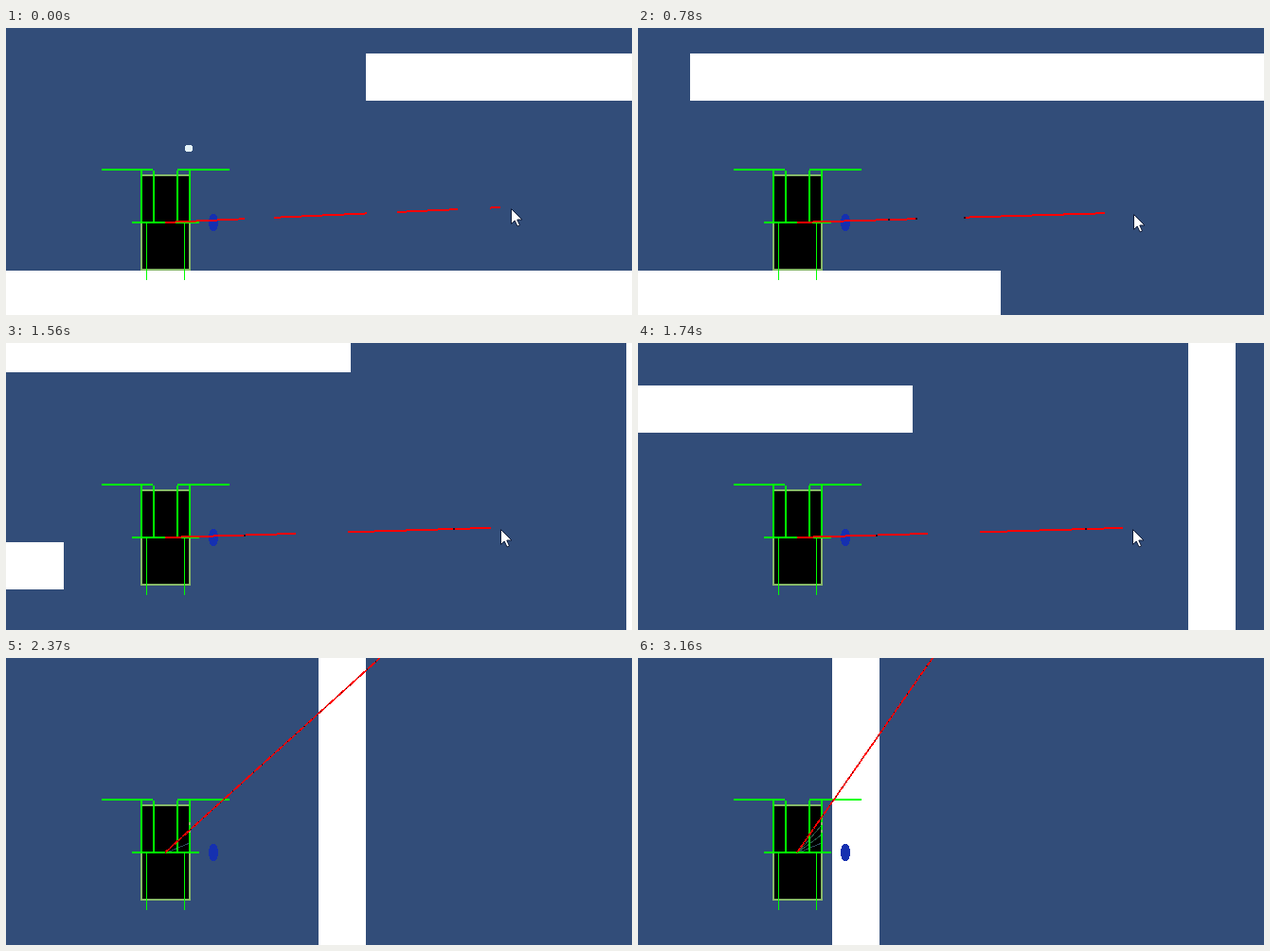
Recreate the animation shown at these times as an HTML page. Size 661 by 304 pixels, loop 3340 ms.

```html
<!DOCTYPE html>
<html lang="en">
<head>
<meta charset="utf-8">
<style>
  html, body { margin: 0; width: 100%; height: 100%; overflow: hidden; background: #324d79; }
  svg { display: block; width: 661px; height: 304px; }
</style>
</head>
<body>
<svg viewBox="0 0 661 304" shape-rendering="crispEdges">
  <rect width="661" height="304" fill="#324d79"/>
  <g fill="#fff">
    <rect id="wall" width="50" height="304"/>
    <rect id="ledge" width="631" height="50"/>
    <rect id="floor" width="1008" height="50"/>
  </g>
  <rect x="143" y="156" width="51" height="100" stroke="#86b868" stroke-width="2"/>
  <g id="fan" fill="none" stroke="#2c4a5a">
    <path d="M170 206L194 196M172 206H194"/>
    <path id="fanHigh" d="M169 206L194 187M169 206L194 177" stroke="#285848"/>
  </g>
  <g fill="none" stroke="#0f0" stroke-width="2">
    <path d="M101 150H155M181 150H236M133 206H204M143 150V206M156 151V206M181 151V206"/>
    <path id="edge" d="M194 150V206"/>
    <path d="M148.500 206V267M188.500 206V267" stroke-width="1"/>
  </g>
  <ellipse cx="219" cy="206" rx="5" ry="9.500" fill="#1530b0"/>
  <circle id="ball" cx="193" cy="127.500" r="4" fill="#e4f2f6"/>
  <path id="beam" fill="none" stroke="#f00" stroke-width="2"/>
  <path id="specks" fill="none" stroke="#300818"/>
  <path id="cursor" d="M.5 .5V16.500L4.200 13L7 19L9.500 18L6.800 12H12Z" fill="#fff" stroke="#101c38" shape-rendering="auto"/>
</svg>
<script>
const LOOP = 3340;
const el = id => document.getElementById(id);
const set = (id, attrs) => {
  for (const key in attrs) el(id).setAttribute(key, attrs[key]);
};
const show = (id, on) => set(id, { visibility: on ? 'visible' : 'hidden' });

// Piecewise linear interpolation through [time, value] pairs.
function track(t, keys) {
  for (let i = 1; i < keys.length; i++) {
    const [t0, a] = keys[i - 1], [t1, b] = keys[i];
    if (t <= t1) return a + (b - a) * Math.max(0, (t - t0) / (t1 - t0));
  }
  return keys[keys.length - 1][1];
}

function scrollX(t) {
  if (t > 2370) return 1116 - 144 * Math.exp((2370 - t) / 390);
  return track(t, [[0, 0], [780, 325], [1560, 647], [1950, 806], [2370, 972]]);
}

// The runner drops off the floor, then jumps in mid-air.
function height(t) {
  const fall = dt => 0.00124 * dt * dt;
  if (t < 1365) return 0;
  if (t < 1560) return -fall(t - 1365);
  return -47 + 0.583 * (t - 1560) - fall(t - 1560);
}

const START = { x: 168, y: 206 };

function beamParts(t) {
  if (t < 150) return [[168, 252], [283, 381], [413, 477], [511, 522]];
  if (t < 1000) return [[168, 295], [344, 493]];
  return [[168, 306], [361, 512]];
}

function drawBeam(t) {
  const sweeping = t >= 1990;
  const endX = sweeping
    ? track(t, [[1990, 512], [2160, 521], [2370, 395], [2650, 322], [2710, 321], [3000, 311]])
    : 512;
  const endY = sweeping
    ? track(t, [[1990, 196], [2160, 0]])
    : track(t, [[0, 190.500], [400, 195.500], [1990, 196]]);
  const slope = (endY - START.y) / (endX - START.x);
  const point = x => `${x} ${START.y + slope * (x - START.x)}`;
  const parts = sweeping ? [[START.x, endX]] : beamParts(t);
  set('beam', {
    d: parts.map(([a, b]) => `M${point(a)}L${point(b)}`).join(''),
    'stroke-width': sweeping ? 1.700 : 2
  });

  let dots = [];
  if (!sweeping && t >= 150) dots = t < 1000 ? [264, 293, 344] : [251, 472];
  set('specks', {
    d: sweeping ? `M${point(START.x)}L${point(endX)}`
                : dots.map(x => `M${point(x)}h2`).join(''),
    'stroke-dasharray': sweeping ? '1 5' : 'none',
    'stroke-width': sweeping ? 1 : 2
  });
}

function render(t) {
  const x = scrollX(t), y = height(t);
  set('wall', { x: Math.round(1302 - x) });
  set('ledge', { x: Math.round(380 - x), y: Math.round(27 + y) });
  set('floor', { x: Math.round(-300 - x), y: Math.round(257 + y) });
  drawBeam(t);

  const cx = track(t, [[0, 533], [400, 523], [1000, 523], [1200, 522]]);
  const cy = track(t, [[0, 191], [400, 197], [1990, 197], [2150, -22]]);
  set('cursor', { transform: `translate(${Math.round(cx)} ${Math.round(cy)})` });
  show('cursor', t < 2150);
  show('ball', t < 30);
  show('fan', t >= 2200);
  show('fanHigh', t >= 2550);
  set('edge', { 'stroke-dasharray': t >= 2200 ? '24 3 5 3' : 'none' });
}

const begin = performance.now();
function tick() {
  render((performance.now() - begin) % LOOP);
  requestAnimationFrame(tick);
}
render(0);
requestAnimationFrame(tick);
</script>
</body>
</html>
```
